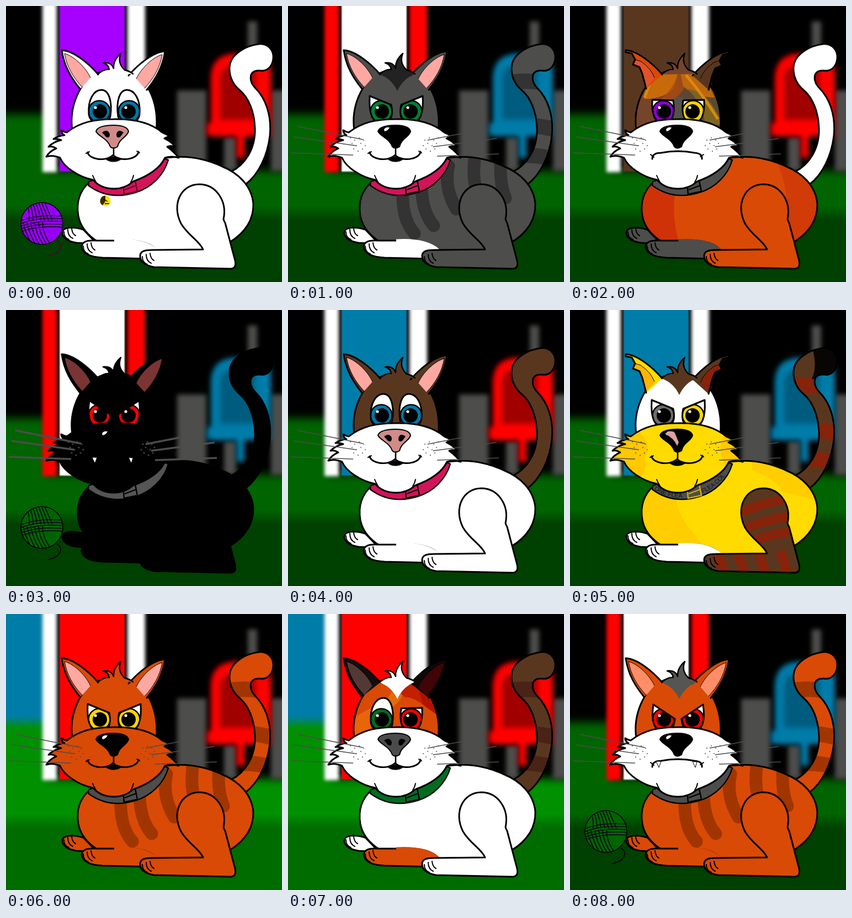
These frames come from a looping animation (500 px wide and 500 px high, 9 s). An HTML page:

```html
<!DOCTYPE html>
<html lang="en">
<head>
<meta charset="utf-8">
<title>Cats in the yard</title>
<style>
html, body { margin: 0; width: 100%; height: 100%; overflow: hidden; background: #000; }
svg { display: block; width: 100vw; height: 100vh; }
.scene { visibility: hidden; }
.ink { stroke: #000; stroke-width: 3; stroke-linejoin: round; stroke-linecap: round; }
.thin { fill: none; stroke: #000; stroke-width: 2; stroke-linecap: round; }
</style>
</head>
<body>
<svg id="stage" viewBox="0 0 500 500" preserveAspectRatio="none"></svg>
<script>
const STEP = 1000;
const ORANGE = '#d94a06', BROWN = '#59371f', GREY = '#4d4d4b', BLUE = '#007ca9', RED = '#ff0000';

const shape = {
  tail: 'M408 300C432 288 452 260 451 222C450 190 439 166 424 153C409 141 402 122 406 104C411 86 434 72 458 69C474 67 486 80 484 96C482 112 471 119 460 117C446 116 441 124 444 136C446 145 452 148 459 157C474 177 481 205 478 235C474 270 458 305 434 323Z',
  body: 'M152 318C133 335 127 357 131 380C137 412 170 437 215 444L300 446C350 448 390 438 405 428C435 410 449 385 448 358C445 325 420 302 390 290C360 276 325 270 290 275Z',
  farPaw: 'M140 405C120 399 103 401 102 410C102 421 114 427 128 429L165 431Z',
  midPaw: 'M137 436C138 426 148 424 165 425L230 425C254 427 268 435 273 443L262 458L175 456C153 455 139 449 137 436Z',
  leg: 'M357 441C350 425 330 416 317 394C299 358 318 323 350 323C381 323 401 354 394 386Q395 390 397 393L415 461Q418 475 408 476L268 473C252 470 243 463 243 453C243 444 251 442 265 442Z',
  head: 'M120 225C114 183 133 138 163 123C185 112 211 112 230 122C262 139 277 183 272 228L196 260Z',
  muzzle: 'M106 234Q100 231 100 225Q104 228 110 229C135 210 160 205 195 205C235 204 263 212 283 229Q291 232 297 237Q291 237 287 240Q300 246 306 255Q299 252 292 255Q304 264 313 275Q300 271 288 275C279 294 258 308 230 318C220 327 208 331 196 331C180 331 167 326 158 315C132 310 105 292 98 275Q84 269 73 273Q79 263 91 258Q84 253 77 255Q86 246 100 243Q93 240 86 241Q95 235 106 234Z',
  ear: 'M134 150C118 130 105 109 101 80C122 81 150 104 167 124',
  earIn: 'M138 147C122 130 110 110 106 86C124 91 145 112 153 130',
  nicked: 'M138 150L131 123L126 111L114 106L118 97L112 86L101 84L101 80C122 81 150 104 167 124',
  nickedIn: 'M138 149L131 123L126 111L114 106L118 97L128 100Q147 113 153 130',
  tuft: 'M166 124Q177 114 187 115Q186 106 176 103Q191 101 195 113Q194 98 208 86Q201 103 215 116Q224 118 230 123',
  collar: 'M150 318L289 277L294 279C286 307 263 329 235 338C202 348 173 343 149 325Z'
};

const lids = {
  round: 'M150 196C148 168 160 152 173 152C186 152 193 172 189 200Q186 212 169 212Q152 211 150 196Z',
  flat: 'M149 170L187 171Q193 212 169 212Q147 212 149 170Z',
  half: 'M148 163L187 179Q194 212 169 212Q145 212 148 163Z',
  angry: 'M151 164L190 190Q189 212 169 212Q144 211 151 164Z'
};

const path = (d, fill, cls = '', more = '') => `<path d="${d}" fill="${fill}" class="${cls}" ${more}/>`;
const line = (d, color, w, more = '') => `<path d="${d}" fill="none" stroke="${color}" stroke-width="${w}" ${more}/>`;
const rect = (x, y, w, h, fill, more = '') => `<rect x="${x}" y="${y}" width="${w}" height="${h}" fill="${fill}" ${more}/>`;
const circle = (x, y, r, fill, more = '') => `<circle cx="${x}" cy="${y}" r="${r}" fill="${fill}" ${more}/>`;
const clip = (name, inner) => `<g clip-path="url(#c-${name})">${inner}</g>`;
const blur = (n, inner) => `<g filter="url(#b${n})">${inner}</g>`;

// A body part: fill, clipped markings, then outline.
const part = (name, fill, marks = '') =>
  path(shape[name], fill) + (marks && clip(name, marks)) + path(shape[name], 'none', 'ink');

const bands = {
  tail: c => [138, 218, 272].map(y => line(`M395 ${y + 2}Q440 ${y - 8} 490 ${y + 8}`, c, 28)).join(''),
  leg: c => [356, 388, 416].map(y => line(`M300 ${y + 16}Q345 ${y - 8} 410 ${y - 16}`, c, 17)).join('') +
    [274, 310, 348, 388].map(x => line(`M${x - 7} 436L${x + 7} 482`, c, 18)).join(''),
  body: c => ['M208 330Q205 385 229 412', 'M242 315Q240 370 264 398', 'M291 290Q282 330 305 368',
    'M340 262Q334 300 339 324', 'M386 275Q382 320 394 348']
    .map(d => line(d, c, 23, 'stroke-linecap="round"')).join('')
};

const petals = (a, b, c, d) =>
  path('M198 112Q150 120 134 168Q165 170 188 150Z', a) +
  path('M198 112Q190 155 152 177Q200 175 210 140Z', b, '', 'opacity=".8"') +
  path('M198 112Q245 120 262 166Q225 165 205 145Z', c) +
  path('M212 150Q255 155 275 215L245 215Q240 175 212 150Z', d);

function backdrop(o) {
  const chair = o.chair, seat = chair === RED ? '#a00000' : '#005c7e';
  return rect(0, 0, 500, 500, '#000') +
    blur(8, rect(-30, -30, 110, 240, o.day ? BLUE : '#000') +
      path('M-30 196H78V298H530V530H-30Z', o.day ? '#009000' : '#006400')) +
    rect(0, 340, 500, 160, `url(#f${o.day ? 1 : 0})`) +
    rect(74, 0, 180, 290, '#000') +
    blur(4, rect(310, 153, 53, 146, GREY) + rect(395, 238, 22, 60, GREY) +
      rect(480, 153, 40, 146, GREY) + rect(438, 28, 17, 120, GREY)) +
    blur(5, path('M371 236V128Q373 88 415 86H463Q480 88 480 112V236Z', chair) +
      rect(364, 212, 116, 23, chair) + rect(418, 235, 14, 40, chair)) +
    blur(5, path('M388 206V130Q390 108 412 108H452V206Z', seat)) +
    blur(1, rect(97, -10, 118, 310, o.glass)) +
    blur(3, rect(66, -20, 26, 321, o.frame) + rect(220, -20, 32, 321, o.frame));
}

function yarn(color) {
  let s = circle(65, 394, 38, color), arcs = '';
  for (let i = 0; i < 7; i++) {
    arcs += `M${32 + i * 6} 350Q${44 + i * 5} 366 ${42 + i * 7} 388`;
    arcs += `M${24 + i * 7} 392Q${30 + i * 6} 415 ${45 + i * 7} 440`;
  }
  for (let i = 0; i < 5; i++) arcs += `M24 ${390 + i * 5}Q60 ${376 + i * 5} 106 ${381 + i * 5}`;
  s += clip('yarn', line('M24 400Q60 386 106 391', color, 22) + line(arcs, '#100018', 1.5));
  return s + circle(65, 394, 38, 'none', 'stroke="#000" stroke-width="1.5"') +
    line('M92 424Q102 429 98 439Q92 450 76 452', color === '#9500f5' ? '#4a0820' : '#000', 1.6);
}

function eye(side, mood, color) {
  const flip = side ? 'transform="translate(392 0) scale(-1 1)"' : '';
  const cx = side ? 226 : 171;
  return `<g ${flip}>${path(lids[mood], '#fff')}${clip(mood,
    circle(169, 191, 19.5, color, 'stroke="#000" stroke-width="2.5"') + circle(170, 191, 13, '#000'))}` +
    path(lids[mood], 'none', 'ink') + '</g>' +
    circle(cx - 9, 184, 2.6, '#fff');
}

function ear(side, [outer, inner], nick) {
  const n = nick ? 'nicked' : 'ear';
  return `<g ${side ? 'transform="translate(389 2) scale(-1 1)"' : ''}>` +
    path(shape[n], outer) + path(shape[n + 'In'], inner, '', 'stroke="#000" stroke-width="1"') +
    path(shape[n], 'none', 'ink') + '</g>';
}

function face(o) {
  let s = path('M163 227C166 218 180 216 195 216C211 216 220 220 222 227C220 237 205 240 202 255Q194 260 189 255C184 240 167 236 163 227Z', o.nose || '#000', 'ink', 'style="stroke-width:2"');
  if (o.nose) s += path('M174 229Q184 222 188 232Q188 241 181 237ZM213 229Q203 222 200 232Q200 241 207 237Z', '#000');
  else s += path('M174 224Q176 219 184 220Q181 226 175 227Z', '#fff');
  if (o.noseMark) s += path('M172 224Q185 216 190 223L197 240L194 246Q188 232 172 224Z', o.noseMark);
  if (o.smile) {
    s += line('M195 256V271', '#000', 2.6) +
      path('M148 265C150 278 180 283 194 270C207 283 238 278 240 264', 'none', 'ink') +
      path('M145 267L151 264M237 263L242 266', 'none', 'thin') +
      path('M179 277Q194 268 211 277Q194 288 179 277Z', '#000');
  } else {
    s += path('M149 277Q149 266 165 266Q195 260 226 266Q240 267 239 277', 'none', 'ink') +
      path('M146 269L152 274M236 273L242 269', 'none', 'thin');
    if (o.fangs) s += path('M156 267L161 278L165 267ZM222 267L227 278L230 268Z', '#fff', '', 'stroke="#000"');
  }
  return s;
}

function whiskers(o) {
  const w = o.bold ? 3.4 : 1.7;
  let dots = '';
  for (let i = 0; i < 11; i++) {
    const x = 113 + (i % 4) * 8 + (i >> 2) * 3, y = 239 + (i >> 2) * 10 + (i % 2) * 4;
    dots += circle(x, y, o.bold ? 1.6 : .9, '#444') + circle(385 - x, y, o.bold ? 1.6 : .9, '#444');
  }
  return dots + line('M17 218L136 242M10 237L123 253M5 266L118 270M253 243L315 231M263 255L378 240M270 272L382 268', '#4c4c4c', w);
}

function collar(o) {
  let s = path(shape.collar, o.collar, '', 'stroke="#000" stroke-width="2.2"');
  if (o.words) s += '<g font-family="\'Liberation Sans\', Arial, sans-serif" font-size="11" fill="#111"><text><textPath href="#band">ONE FLEA</textPath></text><text><textPath href="#band" startOffset="92">FLEA COL</textPath></text></g>';
  s += path('M212 320L234 316L238 336L214 341Z', o.collar, '', `stroke="${o.buckle || '#000'}" stroke-width="2.4"`) +
    line('M215 333L236 325', o.buckle || '#000', 2);
  if (o.bell) s += circle(180, 353, 9.5, '#ffe000') + path('M180 343.5A9.5 9.5 0 0 0 175 361L180 354Z', '#3a2a00') +
    line('M177 350L184 354M179 358H187', '#000', 1.4);
  return s;
}

function cat(o) {
  const toes = (x, y) => path(`M${x} ${y}q0 11 9 14m-2 -18q0 12 9 16m-2 -18q1 10 7 13`, 'none', 'thin');
  const m = o.marks || {}, paw = o.midPaw || o.coat;
  return part('tail', o.tail || o.coat, m.tail) +
    part('farPaw', o.farPaw || o.coat) + toes(105, 409) +
    part('body', o.coat, m.body) +
    part('midPaw', paw) + line('M196 425Q250 422 272 442', paw, 5) + toes(140, 435) +
    part('leg', o.leg || o.coat, m.leg) + toes(247, 454) +
    collar(o) +
    part('head', o.head || o.coat, m.head) +
    ear(0, o.earL, o.nick) + ear(1, o.earR || o.earL, o.nick) +
    path(shape.tuft + (o.tuft ? 'Q208 132 198 154Q188 132 166 124Z' : ''), o.tuft || o.head || o.coat) +
    path(shape.tuft, 'none', 'ink', 'style="stroke-width:2.4"') +
    eye(0, o.eyes[0], o.eyes[1]) + eye(1, o.eyes[2] || o.eyes[0], o.eyes[3] || o.eyes[1]) +
    part('muzzle', o.muzzle, m.muzzle) +
    path('M157 307Q159 312 163 319M231 307Q230 313 226 319', 'none', 'thin') +
    face(o) + (o.whiskers === false ? '' : whiskers(o)) + (o.yarn ? yarn(o.yarn) : '');
}

const yard = (glass, frame, chair, day) => ({ glass, frame, chair, day });
const redYard = yard('#fff', RED, BLUE);
const dayYard = yard(RED, '#fff', RED, true);
const pink = '#ffa8a2';
const tabby = '#a13500';
const rust = '#86230a';
const gold = '#ffdb00';
const goldPatch = path('M330 290Q380 310 385 330Q440 340 450 350V260H330ZM125 300H195Q180 360 225 405Q240 440 310 450H120Z', '#ffcd00');
const goldCheek = path('M70 220H125Q150 245 135 270Q145 300 110 310H70ZM283 220Q262 250 284 290H320V220Z', '#ffc800');

const scenes = [
  { ...yard('#a600ff', '#fff', RED), coat: '#fff', muzzle: '#fff', earL: ['#fff', pink], eyes: ['round', '#0077a5'],
    nose: '#cf8c88', smile: true, collar: '#d3145a', buckle: '#6e0028', bell: true, whiskers: false, yarn: '#9500f5' },
  { ...redYard, coat: GREY, muzzle: '#fff', earL: [GREY, pink], tuft: '#222', farPaw: '#fff', midPaw: '#fff',
    eyes: ['half', '#008030'], smile: true, collar: '#d3145a',
    marks: { body: bands.body('#333'), tail: bands.tail('#333') } },
  { ...yard(BROWN, '#fff', RED), coat: ORANGE, head: '#76442b', muzzle: '#fff', tail: '#fff', farPaw: GREY, midPaw: GREY,
    earL: [ORANGE, '#e2522a'], earR: [BROWN, '#59351f'], nick: true, eyes: ['flat', '#8d00d0', 'flat', '#ffd400'], collar: GREY,
    marks: {
      body: path('M120 300H200Q175 370 203 445H120Z', '#d03208') + path('M370 270Q410 360 385 440H460V270Z', '#d03b08'),
      head: rect(196, 110, 80, 130, '#5d4633') + rect(180, 165, 26, 60, '#54524b') + petals('#c86a0a', '#a84c12', '#bd660d', '#7c6420') + line('M150 130Q140 150 135 166M210 125Q240 160 268 205', '#d88a10', 5)
    } },
  { ...redYard, coat: '#000', muzzle: '#000', earL: ['#000', '#7b3434'], eyes: ['angry', RED], fangs: true, bold: true,
    collar: '#555', yarn: '#006400' },
  { ...yard(BLUE, '#fff', RED), coat: '#fff', head: BROWN, muzzle: '#fff', tail: BROWN, earL: [BROWN, pink],
    eyes: ['round', '#0077a5'], smile: true, nose: '#cf8c88', collar: '#d3145a' },
  { ...yard(BLUE, '#fff', BLUE), coat: gold, head: '#fff', muzzle: gold, tail: BROWN, leg: BROWN, farPaw: '#fff', midPaw: '#fff',
    earL: [gold, '#ffb400'], earR: [BROWN, rust], nick: true, tuft: BROWN, eyes: ['half', '#6d6d6d', 'half', '#ffd500'],
    smile: true, noseMark: '#dca0a6', collar: GREY, buckle: '#d6ad00', words: true,
    marks: { body: goldPatch, muzzle: goldCheek, leg: bands.leg(rust),
      tail: bands.tail(rust) + path('M436 60H500V125H438Q450 100 436 60Z', '#080505') } },
  { ...dayYard, coat: ORANGE, muzzle: ORANGE, earL: [ORANGE, pink], eyes: ['half', '#ffd400'], smile: true, collar: GREY,
    marks: { body: bands.body(tabby), tail: bands.tail(tabby) } },
  { ...dayYard, coat: '#fff', head: ORANGE, muzzle: '#fff', tail: BROWN, midPaw: ORANGE, earL: ['#160d0b', '#543836'],
    earR: ['#100808', '#3f0507'], tuft: '#fff', eyes: ['round', '#006c22', 'flat', '#f00000'], smile: true, nose: '#4b4b4b', collar: '#006c22',
    marks: { head: petals('#d94a06', '#e8740c', '#c22000', '#d94a06') + path('M232 120L280 165V190L245 165Z', '#b01400') + path('M115 190L150 170V230H115Z', '#e86508'),
      tail: bands.tail('#492316') } },
  { ...redYard, coat: ORANGE, muzzle: '#fff', earL: [ORANGE, '#ff8d68'], tuft: '#555552', eyes: ['angry', '#f50000'], fangs: true,
    collar: GREY, yarn: '#006400',
    marks: { body: bands.body(tabby), tail: bands.tail(tabby) } }
];

const clips = { ...lids, ...shape, yarn: 'M27 394a38 38 0 1 0 76 0a38 38 0 1 0 -76 0' };
const fade = (id, a, b) => `<linearGradient id="f${id}" x2="0" y2="1"><stop offset=".14" stop-color="${a}"/><stop offset=".3" stop-color="${b}"/></linearGradient>`;
const defs = Object.entries(clips).map(([k, d]) => `<clipPath id="c-${k}"><path d="${d}"/></clipPath>`).join('') +
  [1, 3, 4, 5, 8].map(n => `<filter id="b${n}" filterUnits="userSpaceOnUse" x="-60" y="-60" width="620" height="620" color-interpolation-filters="sRGB"><feGaussianBlur stdDeviation="${n}"/></filter>`).join('') +
  fade(0, '#006400', '#004000') + fade(1, '#009000', '#006c00') +
  '<path id="band" d="M152 325C185 346 215 341 235 334C262 324 283 304 291 281"/>';

const stage = document.getElementById('stage');
stage.innerHTML = `<defs>${defs}</defs>` +
  scenes.map(o => `<g class="scene">${backdrop(o)}${cat(o)}</g>`).join('');
const groups = [...stage.querySelectorAll('.scene')];

const start = performance.now();
let shown = -1;
function tick(now) {
  const i = Math.floor(Math.max(0, now - start) / STEP) % groups.length;
  if (i !== shown) {
    groups.forEach((g, k) => { g.style.visibility = k === i ? 'visible' : 'hidden'; });
    shown = i;
  }
  requestAnimationFrame(tick);
}
tick(start);
</script>
</body>
</html>
```
